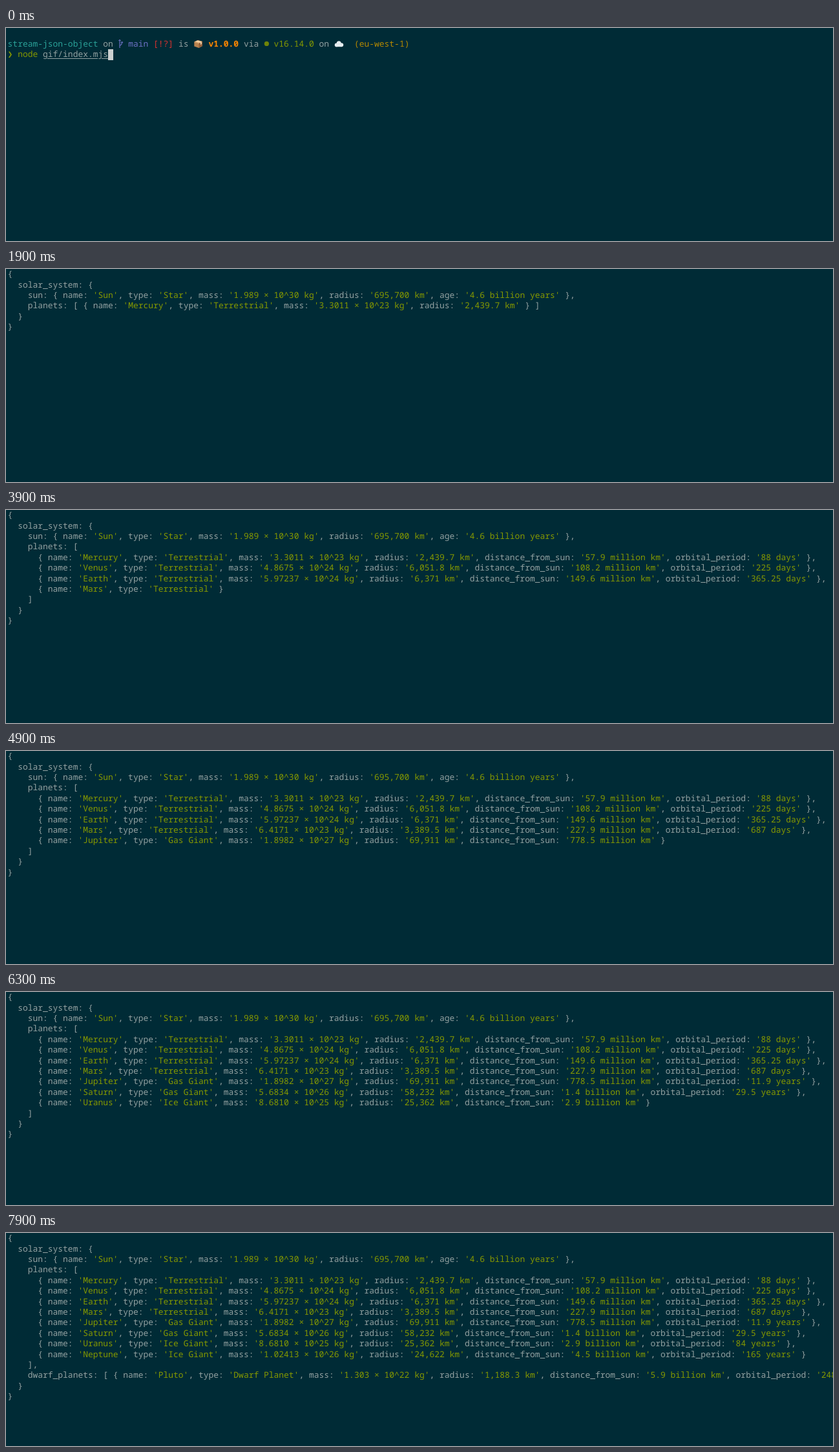
Recreate the animation shown at these times as an HTML page. Size 1280x331 px, loop 8000 ms.

```html
<!DOCTYPE html>
<html lang="en">
<head>
<meta charset="utf-8">
<title>Streaming JSON in a terminal</title>
<style>
  :root { --cell: 7.776px; --row: 16.4px; }
  html, body { margin: 0; width: 100%; height: 100%; overflow: hidden; background: #002b36; }
  #screen {
    position: absolute; left: 0; top: 0; width: 1280px; height: 331px; overflow: hidden;
    font: 12.96px/var(--row) "Noto Sans Mono", "DejaVu Sans Mono", monospace;
    color: #93a1a1; white-space: pre;
    text-rendering: geometricPrecision; font-variant-ligatures: none;
  }
  #output, #prompt { position: absolute; left: 2.6px; top: -0.8px; }
  #icons { position: absolute; left: 0; top: 0; }
  #cursor { position: absolute; width: var(--cell); height: var(--row); background: #cbd0d0; }
  .green { color: #859900; }
  .cyan { color: #2aa198; }
  .violet { color: #6c71c4; }
  .red { color: #dc322f; }
  .yellow { color: #b58900; }
  .orange { color: #ff8700; font-weight: 600; }
  u { text-underline-offset: 2px; text-decoration-thickness: 1px; }
</style>
</head>
<body>
<div id="screen">
  <div id="shell">
    <div id="prompt">
<span class="cyan">stream-json-object</span> on   <span class="violet">main</span> <span class="red">[!?]</span> is    <span class="orange">v1.0.0</span> via   <span class="green">v16.14.0</span> on     <span class="yellow">(eu-west-1)</span>
  <span class="green">node</span> <u>gif/index.mjs</u></div>
    <svg id="icons" width="1280" height="331">
      <text x="2.6" y="45" fill="#859900" font-family="DejaVu Sans Mono, DejaVu Sans, monospace">❯</text>
      <g fill="none" stroke="#6c71c4" stroke-width="1.2">
        <path d="M176 18V31M176 27.5Q179.5 26 179.5 22"/>
        <path d="M174.3 20L176 18L177.7 20M177.8 23L179.5 21L181 23" stroke-width="1"/>
      </g>
      <g>
        <path d="M291.3 21.5L297 19L304 21V28L298.5 31L291.3 28.5Z" fill="#b9824f"/>
        <path d="M291.3 21.5L297 19L304 21L298.5 24Z" fill="#e3b27c"/>
        <path d="M298.5 24L304 21V28L298.5 31Z" fill="#94603a"/>
        <path d="M293.6 20.5L301 22.7V26L302.7 25V21.8L295.5 19.7Z" fill="#f0d9b4"/>
      </g>
      <circle cx="403.4" cy="24.4" r="3.6" fill="#6f8408"/>
      <g fill="#e6edf0">
        <circle cx="511.5" cy="26.4" r="2.8"/>
        <circle cx="515.2" cy="23.8" r="3.5"/>
        <circle cx="519.2" cy="26.2" r="3"/>
        <rect x="511.5" y="25" width="7.7" height="4.2"/>
      </g>
    </svg>
  </div>
  <div id="output"></div>
  <div id="cursor"></div>
</div>
<script>
const LOOP = 8000, TICK = 100, CELL = 7.776, ROW = 16.4, LEFT = 2.6, TOP = 0.4;
const STREAM_START = 1000, STALL = 3400;
const MAX_WIDTH = 180, MAX_NESTING = 3;

const SUN = { name: 'Sun', type: 'Star', mass: '1.989 × 10^30 kg', radius: '695,700 km', age: '4.6 billion years' };
const FIELDS = ['name', 'type', 'mass', 'radius', 'distance_from_sun', 'orbital_period'];
const body = line => Object.fromEntries(line.split('|').map((v, i) => [FIELDS[i], v]));
const PLANETS = [
  'Mercury|Terrestrial|3.3011 × 10^23 kg|2,439.7 km|57.9 million km|88 days',
  'Venus|Terrestrial|4.8675 × 10^24 kg|6,051.8 km|108.2 million km|225 days',
  'Earth|Terrestrial|5.97237 × 10^24 kg|6,371 km|149.6 million km|365.25 days',
  'Mars|Terrestrial|6.4171 × 10^23 kg|3,389.5 km|227.9 million km|687 days',
  'Jupiter|Gas Giant|1.8982 × 10^27 kg|69,911 km|778.5 million km|11.9 years',
  'Saturn|Gas Giant|5.6834 × 10^26 kg|58,232 km|1.4 billion km|29.5 years',
  'Uranus|Ice Giant|8.6810 × 10^25 kg|25,362 km|2.9 billion km|84 years',
  'Neptune|Ice Giant|1.02413 × 10^26 kg|24,622 km|4.5 billion km|165 years'
].map(body);
const PLUTO = body('Pluto|Dwarf Planet|1.303 × 10^22 kg|1,188.3 km|5.9 billion km|248 years');

const take = (obj, count) => Object.fromEntries(Object.entries(obj).slice(0, count));

// Each value takes one step, and each closed object or array one more.
function dataAt(step) {
  const system = { sun: take(SUN, step + 1) };
  const planets = PLANETS.map((p, i) => take(p, Math.max(0, step - 5 - 7 * i)))
    .filter(p => p.name);
  if (planets.length) system.planets = planets;
  if (step >= 63) system.dwarf_planets = [take(PLUTO, step - 62)];
  return { solar_system: system };
}

// Pretty-printer: joins short, shallow objects on one line.
function inspect(root) {
  let deepest = 0;
  const print = (value, depth, indent) => {
    if (typeof value === 'string') return `'${value}'`;
    deepest = depth;
    const list = Array.isArray(value);
    const [open, close] = list ? '[]' : '{}';
    const parts = Object.entries(value).map(([key, v]) =>
      (list ? '' : key + ': ') + print(v, depth + 1, indent + 2));
    const width = parts.join('').length + 2 * parts.length + indent + 11;
    const inline = deepest - depth < MAX_NESTING && width <= MAX_WIDTH &&
      !parts.some(p => p.includes('\n'));
    if (inline) return `${open} ${parts.join(', ')} ${close}`;
    const pad = '\n' + ' '.repeat(indent);
    return `${open}${pad}  ${parts.join(',' + pad + '  ')}${pad}${close}`;
  };
  return print(root, 0, 0);
}

const [shell, output, cursor] = ['shell', 'output', 'cursor'].map(id => document.getElementById(id));

function draw(t) {
  const streaming = t >= STREAM_START;
  let row = t < 300 ? 2 : 3;
  const col = t < 300 ? 20 : 0;
  shell.style.display = streaming ? 'none' : '';
  output.style.display = streaming ? '' : 'none';
  if (streaming) {
    const step = Math.floor((t - STREAM_START) / TICK) - (t >= STALL ? 1 : 0);
    const text = inspect(dataAt(step));
    output.innerHTML = text.replace(/'[^']*'/g, '<span class="green">$&</span>');
    row = text.split('\n').length;
  }
  const lit = t < 900 || Math.floor((t - 900) / 500) % 2 === 1;
  cursor.style.visibility = lit ? 'visible' : 'hidden';
  cursor.style.left = LEFT + col * CELL + 'px';
  cursor.style.top = TOP + row * ROW + 'px';
}

const start = performance.now();
let lastTick = -1;
function frame() {
  const t = Math.max(0, performance.now() - start) % LOOP;
  const tick = Math.floor(t / TICK);
  if (tick !== lastTick) draw(tick * TICK);
  lastTick = tick;
  requestAnimationFrame(frame);
}
frame();
</script>
</body>
</html>
```
